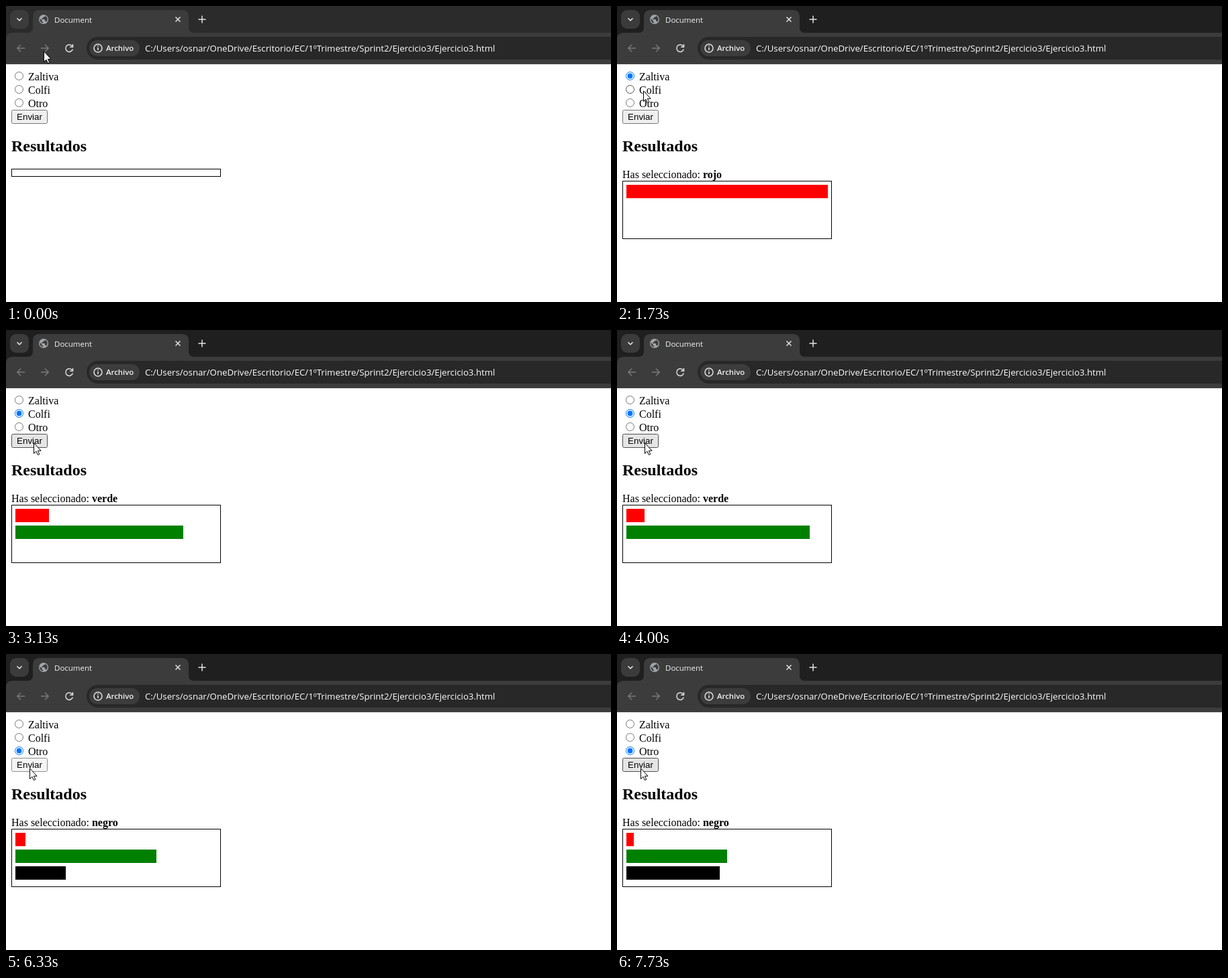
Recreate the animation shown at these times as an HTML page. Size 901x442 px, loop 8 s.

```html
<!DOCTYPE html>
<html lang="es">
<head>
<meta charset="utf-8">
<title>Document</title>
<style>
html, body { margin: 0; width: 100%; height: 100%; overflow: hidden; background: #fff; }
svg { display: block; width: 100%; height: 100%; }
.ui { font-family: "Open Sans", "Noto Sans", sans-serif; fill: #f4f4f4; }
.page { font: 16px "Liberation Serif", "Times New Roman", serif; }
.line { fill: none; stroke-width: 1.5; }
</style>
</head>
<body>
<svg viewBox="0 0 901 442">
  <rect id="strip" width="901" height="50"/>
  <rect x="6" y="6" width="28" height="28" rx="9" fill="#3b3b3b"/>
  <path class="line" stroke="#eee" d="M16.5 18.3l3.5 3.5 3.5-3.5"/>
  <path fill="#3c3c3c" d="M0 87V50Q0 40 10 40H32Q40 40 40 32V16Q40 6 50 6H262Q272 6 272 16V32Q272 40 280 40H901V87Z"/>
  <path stroke="#474747" d="M0 86.5H901"/>
  <circle cx="56" cy="20" r="7" fill="#a0a5aa"/>
  <path fill="#3c3c3c" d="M55.300 25.500Q50.400 24.500 50.400 20L50.500 18.700 53.900 22.100V22.800Q54 24.200 55.300 24.200Z
    M60.100 23.800Q59.800 22.800 58.800 22.800H58.100V20.700Q58 20 57.400 20H53.200V18.600H54.600Q55.300 18.500 55.300 17.900V16.500H56.700Q58 16.400 58.100 14.800Q61.600 16.300 61.600 20Q61.500 22.300 60.100 23.800Z"/>
  <path class="line" stroke="#e3e3e3" d="M252.500 16.500l7 7m0-7l-7 7M286.500 20h11M292 14.500v11"/>
  <g class="line" stroke="#797979">
    <path d="M28 63H17m5-5.200L16.800 63l5.200 5.200"/>
    <path d="M52 63h11m-5-5.200l5.200 5.200-5.200 5.200"/>
    <path stroke="#dedede" d="M98.500 60A5.300 5.300 0 1 0 99.300 64.500M99.500 57v4.200h-4.300"/>
  </g>
  <rect x="120" y="46" width="820" height="34" rx="17" fill="#282828"/>
  <rect x="124" y="51" width="75" height="24" rx="12" fill="#3c3c3c"/>
  <g class="line" stroke="#e3e3e3">
    <circle cx="137" cy="63" r="6"/>
    <path d="M137 62v4M137 59v1.500"/>
  </g>
  <g class="ui">
    <text x="72" y="25" font-size="11.500">Document</text>
    <text x="149" y="67" font-size="11.400" font-weight="600">Archivo</text>
    <text x="207" y="68" font-size="13.230" fill="#fff">C:/Users/osnar/OneDrive/Escritorio/EC/1ºTrimestre/Sprint2/Ejercicio3/Ejercicio3.html</text>
  </g>

  <g class="page">
    <g id="options"></g>
    <rect id="button" x="8.500" y="155.500" width="53" height="20" rx="2"/>
    <text x="35" y="170" text-anchor="middle" style="font: 13.333px 'Liberation Sans', Arial, sans-serif">Enviar</text>
    <text x="8" y="217" style="font-size: 24px; font-weight: bold">Resultados</text>
    <text id="message" x="8" y="257">Has seleccionado: <tspan id="choice" font-weight="bold"></tspan></text>
    <rect id="frame" x="8.500" width="311" fill="none" stroke="#000"/>
    <g id="bars"></g>
  </g>
  <path id="cursor" fill="#fff" stroke="#000" stroke-linejoin="round" d="M.5.8V16.500L4 13.200l2.400 5.300 2.400-1-2.400-5.200h4.700z"/>
</svg>
<script>
const LOOP = 8000, TICK = 1000 / 15;

// Times are in ticks; a burst is a steady run of clicks on the button
const options = [
  { label: "Zaltiva", color: "red", name: "rojo", selectAt: 10,
    bursts: [{ first: 20, count: 1, every: 1 }] },
  { label: "Colfi", color: "green", name: "verde", selectAt: 27,
    bursts: [{ first: 33, count: 1, every: 1 }, { first: 40, count: 13, every: 2.5 }] },
  { label: "Otro", color: "black", name: "negro", selectAt: 77,
    bursts: [{ first: 83, count: 13, every: 2.75 }] }
];

const home = { x: 56, y: 67 };
const moves = [
  { from: 0, to: 4, x: 42, y: 107 },
  { from: 12, to: 17, x: 41, y: 158 },
  { from: 21, to: 24, x: 39, y: 126 },
  { from: 27, to: 31, x: 40, y: 165 },
  { from: 33, to: 34, x: 39, y: 146 },
  { from: 34, to: 36, x: 41, y: 168 },
  { from: 70, to: 75, x: 39, y: 145 },
  { from: 77, to: 81, x: 35, y: 170 }
];

const $ = id => document.getElementById(id);

function set(node, attrs) {
  for (const key in attrs) node.setAttribute(key, attrs[key]);
}

function add(parent, tag, attrs) {
  const node = document.createElementNS("http://www.w3.org/2000/svg", tag);
  set(node, attrs);
  return parent.appendChild(node);
}

// The first press of a burst is held a little longer
const clicks = options.flatMap(option => option.bursts.flatMap(({ first, count, every }) =>
  Array.from({ length: count }, (_, i) => {
    const up = Math.floor(first + every * i);
    return { option, up, down: up - (i ? 1 : 2) };
  })));

options.forEach((option, i) => {
  const y = 104.5 + 20 * i;
  add($("options"), "text", { x: 33, y: y + 6.5 }).textContent = option.label;
  option.ring = add($("options"), "circle", { cx: 19.5, cy: y, r: 6, fill: "#fff" });
  option.dot = add($("options"), "circle", { cx: 19.5, cy: y, r: 3.9 });
  option.bar = add($("bars"), "rect", { x: 14, y: 267 + 25 * i, height: 20, fill: option.color });
});

function pointerAt(tick) {
  let { x, y } = home;
  for (const move of moves) {
    const k = Math.min(1, Math.max(0, (tick - move.from) / (move.to - move.from)));
    const eased = 1 - (1 - k) ** 2;
    x += (move.x - x) * eased;
    y += (move.y - y) * eased;
  }
  return { x: Math.round(x), y: Math.round(y) };
}

function drawRadios(tick, { x, y }) {
  const selected = options.filter(o => o.selectAt <= tick).pop();
  options.forEach((option, i) => {
    const hover = x >= 13 && x < 78 && y < 155 && Math.floor((y - 95) / 20) === i;
    const on = option === selected;
    const color = on ? (hover ? "#005cc8" : "#0075ff") : (hover ? "#4f4f4f" : "#767676");
    set(option.ring, { stroke: color });
    set(option.dot, { fill: on ? color : "none" });
  });
}

function drawButton(tick, { x, y }) {
  const hover = x >= 8 && x < 62 && y >= 155 && y < 176;
  const pressed = hover && clicks.some(c => tick >= c.down && tick < c.up);
  const [fill, stroke] = pressed ? ["#f5f5f5", "#8d8d8d"]
    : hover ? ["#e5e5e5", "#4f4f4f"] : ["#efefef", "#767676"];
  set($("button"), { fill, stroke });
}

function drawResults(tick) {
  const votes = clicks.filter(c => c.up <= tick).map(c => c.option);
  const total = votes.length;
  set($("message"), { visibility: total ? "visible" : "hidden" });
  set($("frame"), total ? { y: 261.5, height: 86 } : { y: 243.5, height: 11 });
  $("choice").textContent = total ? votes[total - 1].name : "";
  for (const option of options) {
    const count = votes.filter(v => v === option).length;
    set(option.bar, { width: total ? Math.round(300 * count / total) : 0 });
  }
}

function draw(now) {
  // Small offset keeps samples taken on a tick boundary in the new tick
  const tick = Math.floor(((now + 4) % LOOP) / TICK);
  const pointer = pointerAt(tick);
  set($("strip"), { fill: tick < 9 ? "#2b2b2b" : "#1f1f1f" });
  set($("cursor"), { transform: `translate(${pointer.x} ${pointer.y})` });
  drawRadios(tick, pointer);
  drawButton(tick, pointer);
  drawResults(tick);
}

const start = performance.now();
function loop() {
  draw(performance.now() - start);
  requestAnimationFrame(loop);
}
loop();
</script>
</body>
</html>
```
